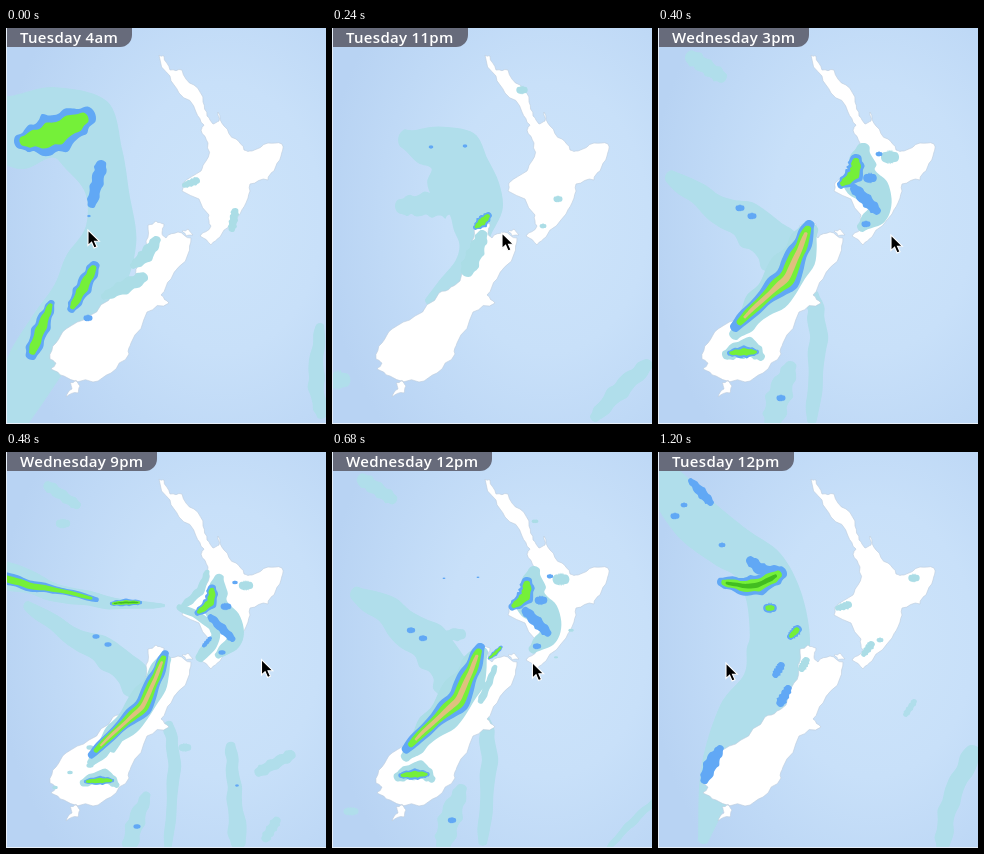
Recreate the animation shown at these times as an HTML page. Size 320 by 396 pixels, loop 1.32 s.

```html
<!DOCTYPE html>
<html lang="en">
<head>
<meta charset="utf-8">
<title>Rain forecast</title>
<style>
html, body { margin: 0; width: 100%; height: 100%; overflow: hidden; background: #c3dcf7; }
svg { position: absolute; left: 0; top: 0; display: block; }
#label {
  position: absolute; left: 1px; top: 0; height: 19px; padding: 0 14px 0 13px;
  border-radius: 0 0 12px 0; background: #676b7b; color: #fff;
  font: 600 15px/18px "Open Sans", "Noto Sans", sans-serif; letter-spacing: .3px; white-space: nowrap;
}
</style>
</head>
<body>
<svg width="320" height="396" viewBox="0 0 320 396">
  <radialGradient id="sea" gradientUnits="userSpaceOnUse" cx="0" cy="0" r="300" gradientTransform="translate(215 190) scale(.75 1)">
    <stop offset="0" stop-color="#cde4fa"/>
    <stop offset=".45" stop-color="#c8e0f9"/>
    <stop offset=".75" stop-color="#bfd9f6"/>
    <stop offset="1" stop-color="#b8d3f3"/>
  </radialGradient>
  <rect width="320" height="396" fill="url(#sea)"/>
  <path id="s" fill="#b0deeb"/>
  <path id="land" fill="#fff" stroke="#bccbdc" stroke-width=".6"/>
  <path id="t" fill="#abdde6"/>
  <path id="b" fill="#61a8f5"/>
  <path id="g" fill="#75f039"/>
  <path id="k" fill="#42bd20"/>
  <path id="p" fill="#dfc07e"/>
  <path d="M.5 0V396M0 395.5H320" stroke="#e8f0fa"/>
</svg>
<div id="label"></div>
<svg width="320" height="396" viewBox="0 0 320 396">
  <path id="cursor" d="M0 0V15.5L3.6 12.2L6.1 18L9 16.8L6.5 11.2H11.3Z" stroke="#fff" stroke-width="1.1"/>
</svg>
<script>
const LOOP = 1320, STEP = 40, N = 10;
const $ = id => document.getElementById(id);
const lerp = (a, b, f) => a + (b - a) * f;
const mix = (p, q, f) => p.map((v, i) => lerp(v, q[i], f));
const parse = text => text.trim().split(/\s+/).map(p => p.split(',').map(Number));

// time ms, forecast hour, cursor x, cursor y
const track = [
  [0, 4, 82, 202], [80, 10, 108, 202], [240, 23, 170, 205], [400, 39, 233, 207],
  [560, 51, 278, 208], [880, 12, 71, 215], [1200, 12, 68, 211]
];

// width of each colour inside a rain band of the given strength
const strength = {
  s: { s: 1 }, t: { t: 1 }, b: { b: 1 }, g: { b: 1, g: .58 },
  k: { b: 1, g: .6, k: .25 }, p: { b: 1, g: .62, p: .25 }
};

// Each line is a band: [name] strength, then its spine as x,y,radius.
// Bands that keep their name move and bend into each other.
const charts = [
  [4, `
    front s 5,100,38 70,105,40 102,165,22 92,245,32 50,300,28 12,375,24
    east s 314,300,5 310,350,8 315,385,6
    north g 17,113,9 45,107,20 78,90,12
    mid b 95,138,6 91,155,6 86,175,5
    west g 88,239,6 77,260,8 66,280,5
    south g 45,276,4 36,298,8 26,325,7
    b 82,290,4
    b 83,188,1.5
    t 150,213,5 140,227,7 128,237,4
    t 136,250,6 118,259,7 99,268,4
    t 229,184,4 226,200,4
    t 190,153,4 179,157,3`],
  [10, `
    front s 10,35,12 45,95,30 95,125,38 115,185,22 100,240,32 58,300,20 44,385,10
    east s 316,298,8 297,345,7 290,392,6
    north p 66,135,5 88,127,11 108,111,9
    wisp b 56,95,5 78,100,9 102,104,6
    cell g 104,146,8
    mid g 126,170,7
    west g 124,209,4 115,237,8 107,257,7
    south g 65,284,4 54,305,9 44,325,7
    streak b 5,22,3 28,33,4 45,44,3
    t 211,196,4`],
  [12, `
    front s 12,35,22 60,90,24 110,120,26 118,185,30 115,225,28 78,278,26 46,385,7
    east s 314,302,9 292,350,9 285,392,8
    north k 64,130,5 95,134,10 121,122,8
    wisp b 93,109,5 105,118,6 122,118,4
    cell g 112,156,6
    mid g 139,178,5 133,184,4
    west b 130,237,4 123,250,5
    south b 62,297,4 54,310,7 47,327,5
    streak b 33,29,3 43,40,5 52,50,4
    b 123,214,4 118,222,4
    b 17,64,4
    b 26,53,3
    b 64,93,3
    t 190,153,4 180,156,3
    t 256,126,5
    t 213,193,4 206,202,3
    t 222,188,3
    t 148,209,4 144,216,4
    s 256,250,3 248,262,3`],
  [23, `
    front s 78,112,12 118,125,28 135,162,34 142,205,18 132,240,12 98,272,5
    east s 314,338,7 288,362,9 264,388,6
    mid g 156,188,4 150,194,6 144,199,3
    s 72,178,9 115,175,14
    s 6,352,11
    t 150,208,6 144,223,8 136,241,8
    t 226,171,4
    t 211,198,3
    t 190,62,5
    b 99,119,2
    b 133,118,2`],
  [39, `
    front s 15,150,8 60,180,14 105,205,22 128,235,20
    s 155,270,8 160,310,9 154,390,6
    s 132,340,7 122,365,12 115,392,10
    s 35,30,8 62,48,7
    t 205,123,8 203,150,18 222,178,13 205,198,6
    t 232,129,8
    t 150,205,11 130,245,20 95,285,13 78,305,7
    t 70,326,6 90,320,10 102,328,5
    p 151,198,6 142,220,10 128,250,13 102,274,8 78,298,6
    g 72,325,3 86,324,6 98,324,3
    g 198,133,7 196,146,9 184,156,5
    b 197,161,5 208,172,6 218,182,5
    b 212,150,6
    b 221,126,3
    b 208,196,4
    b 82,180,4
    b 94,188,4
    b 123,370,4`],
  [51, `
    s 2,125,20 60,145,13 120,156,8 165,158,3
    s 233,300,8 236,340,10 240,392,13
    s 268,390,7 278,374,7
    s 292,308,8 262,324,8
    s 187,300,7
    s 65,76,8
    b 4,98,2 6,115,4
    g 3,129,8 32,138,8 62,143,5 98,152,4
    k 114,156,3 128,155,5 142,155,3
    t 209,125,4 202,143,6 187,157,5
    t 182,160,5 206,172,6 218,188,7 203,209,8
    t 215,145,4
    t 152,236,8 135,260,9 115,301,6
    t 92,300,4
    t 92,318,4
    t 72,325,3
    t 57,340,3
    b 212,191,3 206,198,3
    g 110,291,2
    b 239,338,2`]
].map(([hour, text]) => ({ hour, bands: readBands(text, hour) }));

const coasts = [
  `153,27 158,28 164,42 176,42 188,57 197,74 201,88 207,96 213,93 212,84 218,98 230,111
   238,122 246,123 262,115 276,116 275,128 268,143 262,152 244,156 242,170 234,186 214,209
   205,217 194,208 205,198 203,187 176,163 177,155 195,143 200,133 202,115 195,102 198,97
   190,84 173,65 164,48`,
  `142,197 150,193 158,196 156,205 160,210 172,204 185,210 182,226 165,251 155,267 163,275
   141,284 125,315 123,326 105,345 87,354 58,348 45,341 50,335 44,331 50,315 60,301 83,288
   107,265 119,259 128,253 136,231 140,213`,
  '64,355 70,352 74,358 72,365 60,369 66,361',
  '176,203 182,201 187,207 180,208'
];

// cubic through b and c, with neighbours a and d
function spline(a, b, c, d, u) {
  return b.map((v, i) => v + u / 2 * (c[i] - a[i] + u * (2 * a[i] - 5 * v + 4 * c[i] - d[i]
    + u * (3 * (v - c[i]) + d[i] - a[i]))));
}

function sample(spine) {
  if (spine.length === 1) {
    const [x, y, r] = spine[0];
    spine = [[x - r / 3, y, r * .8], [x + r / 3, y, r * .8]];
  }
  const last = spine.length - 1;
  const at = i => spine[Math.max(0, Math.min(last, i))];
  return Array.from({ length: N + 1 }, (_, i) => {
    const u = i / N * last, k = Math.min(Math.floor(u), last - 1);
    return spline(at(k - 1), at(k), at(k + 1), at(k + 2), u - k);
  });
}

function readBands(text, hour) {
  const bands = {};
  text.trim().split('\n').forEach((line, i) => {
    const [, name, kind, spine] = line.trim().match(/^(?:(\w+) )?(\w) (.+)$/);
    bands[name || hour + '-' + i] = { pts: sample(parse(spine)), widths: strength[kind] };
  });
  return bands;
}

function smooth(pts) {
  const n = pts.length, at = i => pts[(i + n) % n];
  const ctrl = (p, q, r) => p.map((v, j) => (v + (q[j] - r[j]) / 6).toFixed(1));
  return 'M' + pts[0] + pts.map((b, i) => {
    const a = at(i - 1), c = at(i + 1), d = at(i + 2);
    return 'C' + [ctrl(b, c, a), ctrl(c, b, d), c];
  }).join('') + 'Z';
}

// rounded, slightly uneven outline around a spine
function ribbon(pts, width) {
  const span = .7 + .3 * width, left = [], right = [], caps = [];
  for (let i = 0; i <= N; i++) {
    const u = N / 2 + (i - N / 2) * span, k = Math.min(Math.floor(u), N - 1);
    const [x, y, radius] = mix(pts[k], pts[k + 1], u - k);
    const a = pts[Math.max(0, k - 1)], b = pts[Math.min(N, k + 2)];
    const angle = Math.atan2(b[1] - a[1], b[0] - a[0]);
    const edge = (turn, r) => [x + Math.cos(angle + turn) * r, y + Math.sin(angle + turn) * r];
    const r = radius * width;
    left.push(edge(-Math.PI / 2, r * (1 + .14 * Math.sin(i * 1.9 + pts.length))));
    right.unshift(edge(Math.PI / 2, r * (1 + .14 * Math.sin(i * 2.3))));
    if (i === 0) caps.push([2.4, Math.PI, -2.4].map(turn => edge(turn, r)));
    if (i === N) caps.push([-.75, 0, .75].map(turn => edge(turn, r)));
  }
  return smooth([...left, ...caps[1], ...right, ...caps[0]]);
}

// split every side twice, pushing the middle sideways at random
function coast(pts) {
  let seed = 11;
  const rnd = () => (seed = seed * 16807 % 2147483647) / 2147483647 - .5;
  for (let pass = 0; pass < 2; pass++) {
    pts = pts.flatMap(([x, y], i) => {
      const [u, v] = pts[(i + 1) % pts.length], push = rnd() * .3;
      return [[x, y], [(x + u) / 2 + (v - y) * push, (y + v) / 2 - (u - x) * push]];
    });
  }
  return 'M' + pts.map(p => p.map(v => v.toFixed(1))).join('L') + 'Z';
}

function setRain(hour) {
  let i = charts.length - 2;
  while (i > 0 && charts[i].hour > hour) i--;
  const a = charts[i], b = charts[i + 1], f = (hour - a.hour) / (b.hour - a.hour);
  const paths = { s: '', t: '', b: '', g: '', k: '', p: '' };
  for (const name of new Set([...Object.keys(a.bands), ...Object.keys(b.bands)])) {
    const from = a.bands[name], to = b.bands[name];
    // unnamed bands swell and fade while the wind carries them
    const size = from && to ? 1 : Math.sqrt(from ? 1 - f : f);
    if (size === 0) continue;
    const wind = from && to ? 0 : from ? f : f - 1;
    const pts = (from || to).pts.map((p, j) => {
      const [x, y, r] = from && to ? mix(p, to.pts[j], f) : p;
      return [x + 16 * wind, y + 9 * wind, r * size];
    });
    for (const level in paths) {
      const w0 = (from || to).widths[level] || 0, w1 = (to || from).widths[level] || 0;
      const width = lerp(w0, w1, f);
      if (width > 0) paths[level] += ribbon(pts, width);
    }
  }
  for (const level in paths) $(level).setAttribute('d', paths[level]);
}

function hourText(hour) {
  const day = ['Tuesday', 'Wednesday', 'Thursday'][Math.floor(hour / 24)];
  const h = hour % 24;
  return `${day} ${h % 12 || 12}${h < 12 ? 'am' : 'pm'}`;
}

function draw(t) {
  let k = track.length - 2;
  while (track[k][0] > t) k--;
  const a = track[k], b = track[k + 1];
  const [, hour, x, y] = mix(a, b, (t - a[0]) / (b[0] - a[0]));
  const whole = Math.round(hour);
  setRain(whole);
  $('label').textContent = hourText(whole);
  $('cursor').setAttribute('transform', `translate(${x.toFixed(1)} ${y.toFixed(1)})`);
}

$('land').setAttribute('d', coasts.map(text => coast(parse(text))).join(''));

const start = performance.now();
let shown = -1;
function tick() {
  const ms = (performance.now() - start) % LOOP;
  const t = Math.min(Math.floor(ms / STEP) * STEP, 1200);
  if (t !== shown) draw(shown = t);
  requestAnimationFrame(tick);
}
tick();
</script>
</body>
</html>
```
